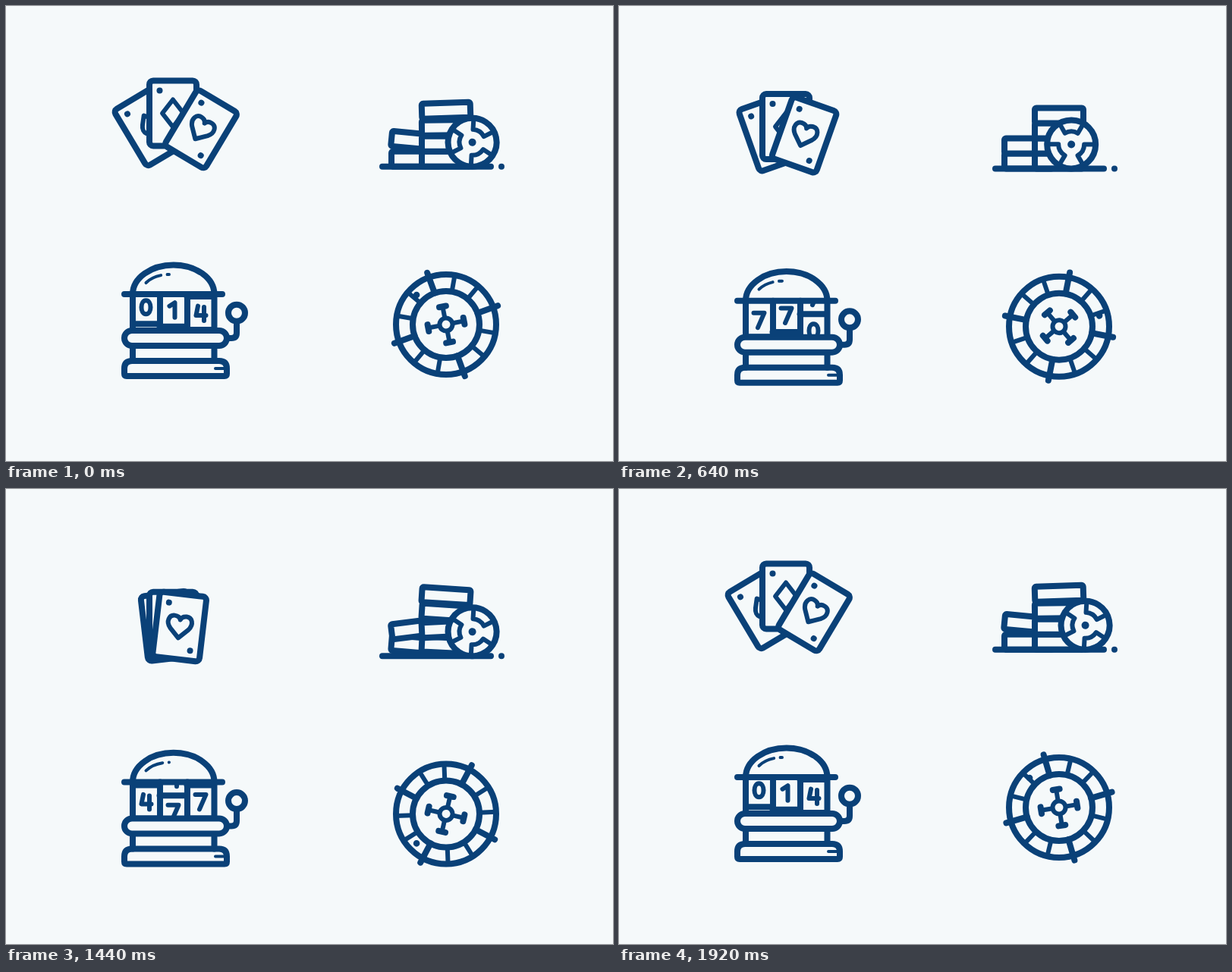
These frames come from a looping animation (800 px wide and 600 px high, 1960 ms). An HTML page:

```html
<!DOCTYPE html>
<html lang="en">
<head>
<meta charset="utf-8">
<title>Casino icons</title>
<style>
  html, body { margin: 0; width: 100%; height: 100%; overflow: hidden; background: #f5f9fa; }
  svg { display: block; width: 100vw; height: 100vh; }
  .line { fill: none; stroke: #0a4178; stroke-width: 8; stroke-linecap: round; stroke-linejoin: round; }
  .line .solid { fill: #f5f9fa; }
  .line .thin { stroke-width: 6; }
  .line .fine { stroke-width: 4; }
  .line .dot { fill: #0a4178; stroke: none; }
</style>
</head>
<body>
<svg viewBox="0 0 800 600"><g class="line" id="stage"></g></svg>
<script>
const LOOP = 1960, CYCLE = 1920, STEP = 40;
const stage = document.getElementById('stage');
const $ = id => document.getElementById(id);
const dot = (x, y, r = 4) => `<circle class="dot" cx="${x}" cy="${y}" r="${r}"/>`;
const path = (d, cls = '') => `<path class="${cls}" d="${d}"/>`;
const group = (id, body) => `<g id="${id}">${body}</g>`;
const repeat = (n, f) => Array.from({ length: n }, (_, i) => f(i)).join('');
const turned = (angle, body) => `<g transform="rotate(${angle})">${body}</g>`;
const place = (id, x, y, angle = 0) =>
  $(id).setAttribute('transform', `translate(${x} ${y}) rotate(${angle})`);

// Cards
const suits = {
  spade: 'M0-17L-8-7C-15 2-7 11 0 6C7 11 15 2 8-7Z',
  diamond: 'M0-18L14 0L0 18L-14 0Z',
  heart: 'M0 15L-12 3C-19-5-15-14-8-14C-4-14-1-12 0-9C1-12 4-14 8-14C15-14 19-5 12 3Z'
};
const cards = Object.keys(suits).map(name => group(name,
  '<rect class="solid" x="-31" y="-43" width="62" height="86" rx="5"/>' +
  dot(-17.5, -30) + dot(17.5, 30) + path(suits[name], 'thin'))).join('');

// Chips: lift and tilt while the stacks hop
const chips = [
  { x: 540, level: 0, end: 1920, lift: 8, tilt: 5 },
  { x: 540, level: 1, end: 2000, lift: 11, tilt: -8 },
  { x: 580, level: 0, end: 1900, lift: 7, tilt: 3 },
  { x: 580, level: 1, end: 1900, lift: 9, tilt: -3 },
  { x: 580, level: 2, end: 1940, lift: 13, tilt: 4 },
  { x: 580, level: 3, end: 1970, lift: 16.5, tilt: 4 }
];
const stacks = chips.map((c, i) => group('chip' + i,
  '<rect class="solid" x="-32" y="-10" width="64" height="20" rx="2"/>')).join('');
const roller = group('roller',
  '<circle class="solid" r="32"/>' + dot(0, 0, 5) +
  repeat(3, i => turned(i * 120, path('M-15-26L-8.5-14.7A17 17 0 0 1 8.5-14.7L15-26', 'thin'))));
const table = group('table', path('M496 0H639') + dot(653, 0));

// Slot machine, drawn relative to its shelf
const digits = {
  0: 'M0-9C8-9 8 9 0 9C-8 9-8-9 0-9Z',
  1: 'M-5-5L2-9.5V10',
  4: 'M-3.5-9.5L-6 3H7M4.5-8V10',
  7: 'M-7-9.5H7L-1.5 10'
};
const strip = [7, 0, 1, 4, 7, 0].map((n, i) =>
  `<g transform="translate(0 ${(i - 4) * 44})">${path(digits[n], 'thin')}${path('M-18 22H18')}</g>`).join('');
const slot = group('slot',
  '<clipPath id="window"><rect x="163" y="0" width="115" height="48"/></clipPath>' +
  `<g clip-path="url(#window)">${repeat(3, i => group('reel' + i, strip))}</g>` +
  path('M167 0V48M203 0V48M239 0V48M274.500 0V48M167 68V88M274.500 68V88') +
  path('M167 0A53.700 38.500 0 0 1 274.500 0M156 0H285') +
  '<path id="shine" class="fine" d="M184.500-15Q195-25.500 215-26"/>' +
  '<path id="stem"/>' +
  '<rect class="solid" x="156" y="48" width="135" height="20" rx="10"/>' +
  path('M166 88H281Q291 88 291 98V105Q291 108 288 108H159Q156 108 156 105V98Q156 88 166 88Z') +
  path('M276 98H289', 'fine') +
  '<circle id="knob" class="solid" cx="304" r="11"/>');

// Roulette wheel
const wheel = group('wheel',
  '<circle r="66"/><circle r="44"/>' +
  group('spokes', repeat(12, i => turned(i * 30, i % 3 ? path('M0-44V-66', 'thin') : path('M0-44V-72.500')))) +
  group('hub', '<circle class="thin" r="8.500"/>' +
    repeat(4, i => turned(i * 90, path('M0-10V-24', 'thin') + path('M-4.500-24H4.500')))) +
  group('ball', dot(0, -55, 4.3)));

stage.innerHTML = cards + stacks + table + roller + slot + wheel;

const wave = (t, peak) => Math.cos(2 * Math.PI * (t - peak) / CYCLE);
const since = (t, start) => (t - start + 2 * CYCLE) % CYCLE;
const ease = p => (1 - Math.cos(Math.PI * Math.max(0, Math.min(1, p)))) / 2;

function drawCards(t) {
  const open = 1 + wave(t, 200), angle = 17.2 * open, rad = angle * Math.PI / 180;
  const pivot = 260.7 - 20.5 * open;
  const dx = 71.7 * Math.sin(rad), y = pivot - 71.7 * Math.cos(rad);
  place('spade', 220 - dx + 4 * open, y - 1.8 * open, -angle);
  place('diamond', 220, 189 - 26.5 * open);
  place('heart', 220.3 + dx, y, angle);
}

function drawChips(t) {
  const ground = 216 - 6 * wave(t, 240);
  const x = 606.8 + 11 * wave(t, 1680);
  chips.forEach((c, i) => {
    const p = Math.min(1, since(t, 1320) / (c.end - 1320));
    place('chip' + i, c.x, ground - 10 - 20 * c.level - c.lift * Math.sin(Math.PI * p),
      c.tilt * Math.sin(2 * Math.PI * p));
  });
  place('table', 0, ground);
  place('roller', x, ground - 32, (x - 596) / 32 * 180 / Math.PI);
}

function drawSlot(t) {
  place('slot', 0, 386 - 6 * wave(t, 20));
  for (let i = 0; i < 3; i++) {
    const spin = 176 * ease(since(t, 900 + 243 * i) / 1610);
    place('reel' + i, 184.5 + 36 * i, 25.5 + spin);
  }
  const pull = t < 960 ? ease((t - 660) / 300) : 1 - ease((t - 960) / 377);
  const knob = 24.7 + 29 * pull;
  $('knob').setAttribute('cy', knob);
  $('stem').setAttribute('d', `M291 58H297Q304 58 304 51V${knob + 11}`);
  $('shine').setAttribute('stroke-dasharray', `${22.5 + 2 * wave(t, 1420)} 8.5 50`);
}

function drawWheel(t) {
  place('wheel', 580, 424.2 - 6 * wave(t, 240));
  place('spokes', 0, 0, -20 - 180 * t / LOOP);
  place('hub', 0, 0, -11 - 90 * t / LOOP);
  place('ball', 0, 0, -45 + 360 * t / CYCLE);
}

function frame() {
  const t = Math.floor(performance.now() % LOOP / STEP) * STEP;
  drawCards(t);
  drawChips(t);
  drawSlot(t % CYCLE);
  drawWheel(t);
  requestAnimationFrame(frame);
}
frame();
</script>
</body>
</html>
```
